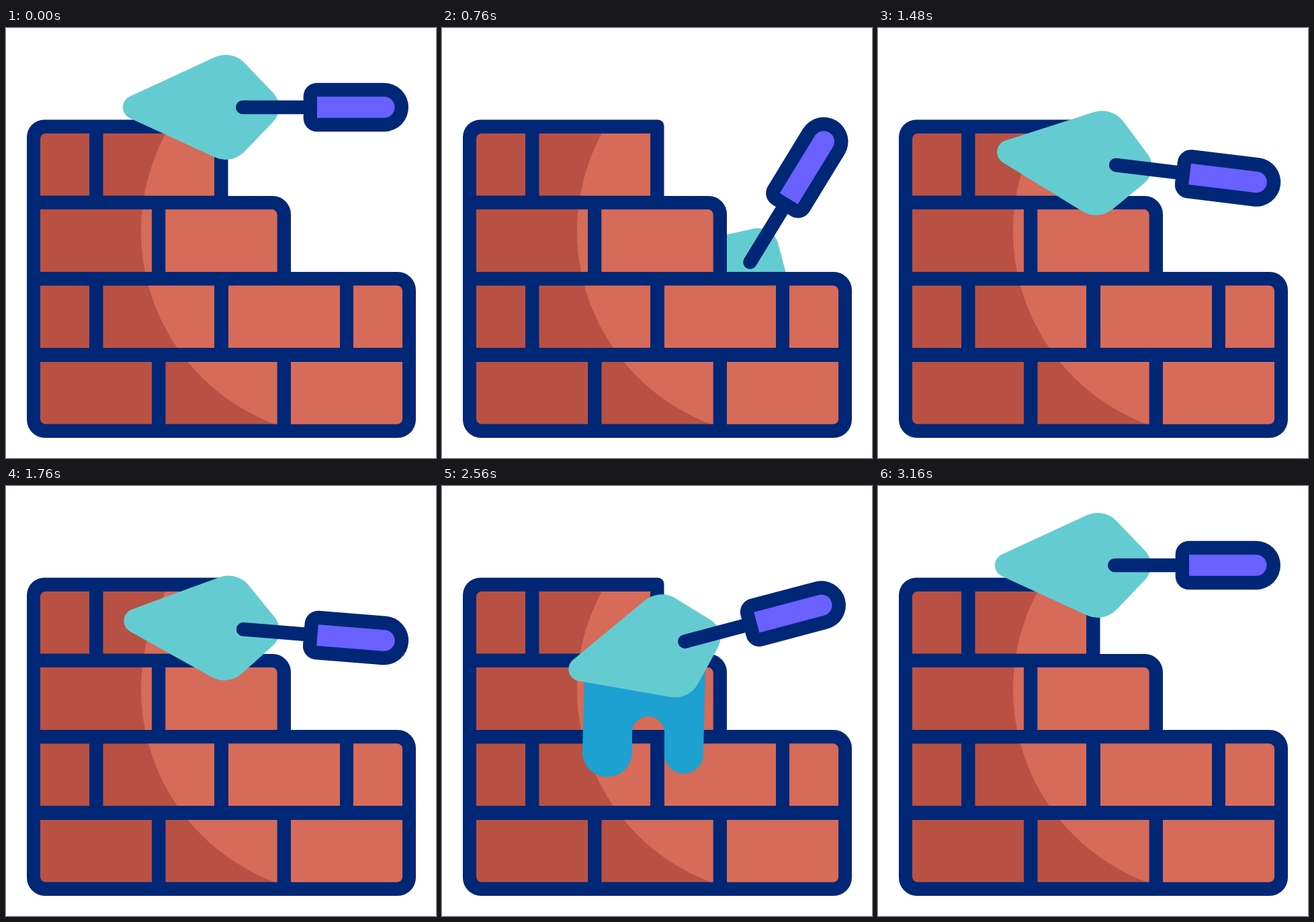
Recreate the animation shown at these times as an HTML page with a canvas. Size 640x640 px, loop 3.6 s.

```html
<!DOCTYPE html>
<html lang="en">
<head>
<meta charset="utf-8">
<title>Brick wall and trowel</title>
<style>
html, body { margin: 0; width: 100%; height: 100%; overflow: hidden; background: #fff; }
canvas { display: block; width: 640px; height: 640px; }
</style>
</head>
<body>
<canvas id="stage" width="640" height="640"></canvas>
<script>
const ctx = document.getElementById('stage').getContext('2d');
const LOOP = 3600, STEP = 40, RAD = Math.PI / 180;
const NAVY = '#002776', LIGHT = '#d66b59', DARK = '#b85143';
const TEAL = '#64ccd1', PURPLE = '#6960ff', BLUE = '#1ca1d0';

const clamp = v => Math.min(1, Math.max(0, v));
const sine = p => (1 - Math.cos(Math.PI * p)) / 2;
const cubic = p => p < 0.5 ? 4 * p ** 3 : 1 - 4 * (1 - p) ** 3;
const mix = (a, b, k) => a.map((v, i) => v + (b[i] - v) * k);
const between = (t, t0, t1, a, b, ease = sine) => mix(a, b, ease(clamp((t - t0) / (t1 - t0))));

function box(x0, y0, x1, y1, r) {
  ctx.roundRect(x0, y0, x1 - x0, y1 - y0, r);
}

function fillBox(color, ...args) {
  ctx.fillStyle = color;
  ctx.beginPath();
  box(...args);
  ctx.fill();
}

// Left, top, right, bottom, corner radii
const BRICKS = [
  [51, 157, 124, 249.5, [8, 0, 0, 0]], [144.5, 157, 310, 249.5, 0],
  [51, 270, 217, 363, 0], [237.5, 270, 403.5, 363, [0, 8, 0, 0]],
  [51, 383.5, 124, 476, 0], [144.5, 383.5, 310, 476, 0],
  [331, 383.5, 497, 476, 0], [517, 383.5, 590, 476, [0, 8, 0, 0]],
  [51, 497, 217, 589.5, [0, 0, 0, 8]], [237.5, 497, 403.5, 589.5, 0],
  [424, 497, 590, 589.5, [0, 0, 8, 0]]
];

function drawWall() {
  fillBox(NAVY, 31, 136.5, 330.5, 300, [26, 9, 0, 0]);
  fillBox(NAVY, 31, 250, 424, 400, [0, 27, 0, 0]);
  fillBox(NAVY, 31, 363, 610, 610, [0, 27, 27, 27]);
  ctx.save();
  ctx.beginPath();
  BRICKS.forEach(b => box(...b));
  ctx.fillStyle = DARK;
  ctx.fill();
  ctx.clip();
  ctx.fillStyle = LIGHT;
  ctx.beginPath();
  ctx.arc(507.5, 302.5, 306.5, 0, 7);
  ctx.fill();
  ctx.restore();
}

// The trowel's origin is the round end of its shaft on the blade
function drawTrowel([x, y, deg]) {
  ctx.save();
  ctx.translate(x, y);
  ctx.rotate(deg * RAD);
  ctx.fillStyle = TEAL;
  ctx.beginPath();
  ctx.moveTo(-90, -52);
  ctx.arcTo(-16, -86, 66, 0, 39);
  ctx.arcTo(66, 0, -16, 86, 31);
  ctx.arcTo(-16, 86, -203, 0, 39);
  ctx.arcTo(-203, 0, -16, -86, 18);
  ctx.closePath();
  ctx.fill();
  fillBox(NAVY, -10, -10.3, 100, 10.3, 10.3);
  fillBox(NAVY, 90.7, -36.3, 247, 36.3, [20, 36.3, 36.3, 20]);
  fillBox(PURPLE, 111, -15.8, 226.5, 15.8, [0, 15.8, 15.8, 0]);
  ctx.restore();
}

// The mortar's origin is the centre of its left drip
function drawMortar([x, y, deg, scale]) {
  ctx.save();
  ctx.translate(x, y);
  ctx.rotate(deg * RAD);
  ctx.scale(scale, scale);
  ctx.fillStyle = BLUE;
  ctx.beginPath();
  ctx.moveTo(-34, -116);
  ctx.arc(0, 0, 37, Math.PI, 0, true);
  ctx.arc(61, -29, 24, Math.PI, 0);
  ctx.arc(114, 3, 29, Math.PI, 0, true);
  ctx.lineTo(146, -120);
  ctx.lineTo(100, -150);
  ctx.closePath();
  ctx.fill();
  ctx.restore();
}

// Rocks the trowel about its handle
function rock(deg) {
  const c = Math.cos(deg * RAD), s = Math.sin(deg * RAD);
  return [576 - 224 * c + 2 * s, 233 - 224 * s - 2 * c, deg];
}

const HOME = [352, 118, 0], DIP = [458, 348, -58.5], DIG = [481, 410, -62.7];
const PRESS = [362.6, 251, -17.4], REST = rock(0);

function trowelPose(t) {
  if (t < 740) return between(t, 0, 440, HOME, DIP, cubic);
  if (t < 1020) return between(t, 740, 1020, DIP, DIG);
  if (t < 1300) return between(t, 1020, 1300, DIG, rock(-16));
  if (t < 1580) return rock(between(t, 1300, 1580, [-16], [16])[0]);
  if (t < 1860) return rock(between(t, 1580, 1860, [16], [0])[0]);
  if (t < 2420) return between(t, 2100, 2420, REST, PRESS);
  return between(t, 2420, 2980, PRESS, HOME);
}

const TUCKED = [298, 262, -25, 0.4], DRIP = [281, 360, -14, 0.97];
const SPREAD = [252, 399, -4, 1], HANG = [246, 396, 0, 1];
const SWUNG = [165, 212, 30, 0.9], GONE = [290, 142, 10, 0.35];

function mortarPose(t) {
  if (t < 1860 || t >= 3160) return null;
  if (t < 2080) return between(t, 1860, 2080, TUCKED, DRIP);
  if (t < 2420) return between(t, 2080, 2420, DRIP, SPREAD);
  if (t >= 2980) return between(t, 2980, 3180, SWUNG, GONE);
  const k = sine((t - 2420) / 560), split = sine(0.25);
  return k < split ? mix(SPREAD, HANG, k / split)
                   : mix(HANG, SWUNG, (k - split) / (1 - split));
}

function draw(now) {
  const t = Math.floor((now % LOOP) / STEP) * STEP;
  const behind = t >= 160 && t < 1180;
  const trowel = trowelPose(t), mortar = mortarPose(t);
  ctx.fillStyle = '#fff';
  ctx.fillRect(0, 0, 640, 640);
  if (behind) drawTrowel(trowel);
  drawWall();
  if (mortar) drawMortar(mortar);
  if (!behind) drawTrowel(trowel);
}

const start = performance.now();
function tick() {
  draw(performance.now() - start);
  requestAnimationFrame(tick);
}
tick();
</script>
</body>
</html>
```
